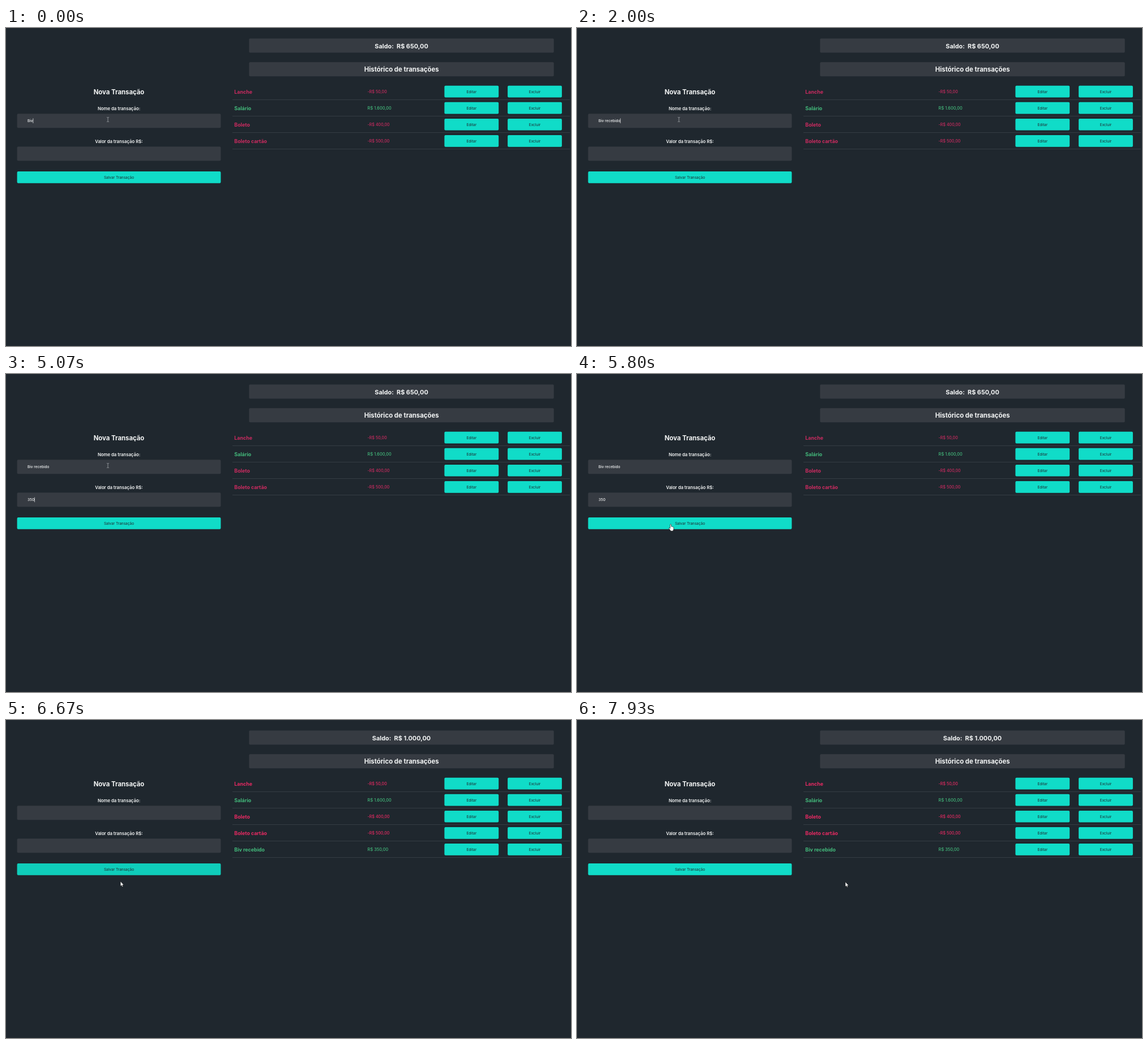
Animation of 998 by 561 pixels, one loop 8 s. Source, as an HTML page:

```html
<!DOCTYPE html>
<html lang="pt-BR">
<head>
<meta charset="utf-8">
<title>Transações</title>
<style>
html, body { margin: 0; width: 100%; height: 100%; overflow: hidden; background: #1f272e; }
svg { display: block; width: 100%; height: 100%; }
text { font-family: Inter, sans-serif; white-space: pre; }
</style>
</head>
<body>
<svg id="stage" viewBox="0 0 998 561"></svg>
<script>
const LOOP = 8000;
const TEAL = '#10dcc8', PANEL = '#363b42', WHITE = '#f3f5f5', INK = '#1f272e';
const GREEN = '#43b97b';
const stage = document.getElementById('stage');

function add(tag, attrs, parent = stage) {
  const el = document.createElementNS('http://www.w3.org/2000/svg', tag);
  for (const k in attrs) el.setAttribute(k, attrs[k]);
  parent.appendChild(el);
  return el;
}

const box = (x, y, w, h, fill, parent) =>
  add('rect', { x, y, width: w, height: h, rx: 2, fill }, parent);

// cy is the middle of the capital letters
function label(str, x, cy, size, weight, fill, anchor = 'middle', parent) {
  const el = add('text', {
    x, y: cy + size * 0.364, fill, 'font-size': size,
    'font-weight': weight, 'text-anchor': anchor
  }, parent);
  el.textContent = str;
  return el;
}

function button(str, x, y, w, parent) {
  const rect = box(x, y, w, 20.7, TEAL, parent);
  label(str, x + w / 2, y + 10.7, 6.5, 400, INK, 'middle', parent);
  return rect;
}

// Balance and history
box(429.3, 18.6, 538.4, 25, PANEL);
box(429.3, 60.2, 538.4, 25, PANEL);
const balance = label('', 698.5, 31.6, 10.9, 700, WHITE);
label('Histórico de transações', 698.7, 73.2, 11.4, 700, WHITE);

const reds = [];
function row(i, name, value) {
  const g = add('g', {});
  const y = 101.8 + i * 29.05;
  const gain = value[0] !== '-';
  const texts = [
    label(name, 403.3, y + 10.9, 8.85, 700, GREEN, 'start', g),
    label(value, 638.6, y + 10.8, gain ? 7.4 : 7.1, 500, GREEN, 'start', g)
  ];
  if (!gain) reds.push(...texts);
  button('Editar', 774.4, y, 95.8, g);
  button('Excluir', 886.1, y, 95.8, g);
  add('rect', { x: 400, y: y + 24.2, width: 596, height: 0.8, fill: '#3a4249' }, g);
  return g;
}
row(0, 'Lanche', '-R$ 50,00');
row(1, 'Salário', 'R$ 1.600,00');
row(2, 'Boleto', '-R$ 400,00');
row(3, 'Boleto cartão', '-R$ 500,00');
const newRow = row(4, 'Biv recebido', 'R$ 350,00');

// Form
label('Nova Transação', 199.5, 112.8, 11.35, 700, WHITE);
label('Nome da transação:', 199.5, 142.2, 7.75, 600, WHITE);
label('Valor da transação R$:', 199.5, 200.3, 7.75, 600, WHITE);
function field(y) {
  box(19.6, y, 359.8, 25, PANEL);
  return label('', 38, y + 12.5, 6.45, 500, WHITE, 'start');
}
const nameField = field(151.3);
const valueField = field(209.3);
const save = button('Salvar Transação', 19.6, 253, 359.8);
const caret = add('rect', { width: 0.7, height: 8.6, fill: WHITE });

// Pointers, each with its hot spot at 0,0
const pointers = {
  beam: add('path', {
    d: 'M-2-4Q0-4 0-3Q0-4 2-4M0-3V3M-2 4Q0 4 0 3Q0 4 2 4',
    fill: 'none', stroke: '#a9adb0', 'stroke-width': 0.75
  }),
  arrow: add('path', {
    d: 'M0 0V8.4L1.9 6.7L3.1 9.4L4.5 8.8L3.3 6.2H5.8Z',
    fill: '#fff', stroke: '#111', 'stroke-width': 0.5
  }),
  hand: add('path', {
    d: 'M-1 .8Q-1-.3 0-.3Q.9-.3 1 .8V4Q2 3.2 2.7 4.2Q3.6 3.7 4.1 4.7Q5.3 4.4 5.3 5.7V8Q5.3 9.6 4.3 10.5V11.8H-.4V10.8L-3.2 7.3Q-3.6 6.2-2.6 6L-1 7.2Z',
    fill: '#fff', stroke: '#111', 'stroke-width': 0.6
  })
};

// Typing: [time, number of letters]
const nameKeys = [[0, 3], [130, 4], [400, 5], [870, 6], [1000, 7], [1400, 8], [1600, 9], [1670, 11], [1730, 12]];
const valueKeys = [[0, 0], [4670, 1], [4730, 2], [5000, 3]];
const typed = (str, keys, t) => str.slice(0, keys.filter(k => k[0] <= t).pop()[1]);

// Pointer path: [time, x, y]
const path = [
  [0, 180, 161.5], [5130, 180, 161.5], [5400, 175, 205], [5670, 167, 260],
  [5800, 165.5, 265.2], [6200, 167, 265.2], [6330, 171, 276], [6400, 175, 285], [6600, 175, 285],
  [6900, 290, 284], [7200, 409.5, 264.7], [7420, 409.5, 264.7],
  [7650, 437, 276], [7930, 474, 285.7], [LOOP, 474, 285.7]
];
const mix = (a, b, k) => a + (b - a) * k;
const ramp = (t, a, b) => Math.min(1, Math.max(0, (t - a) / (b - a)));

function pointerAt(t) {
  const i = path.findIndex(p => p[0] > t);
  const [a, b] = [path[i - 1], path[i]];
  const k = ramp(t, a[0], b[0]);
  return [mix(a[1], b[1], k), mix(a[2], b[2], k)];
}

function pointerKind(x, y) {
  const inside = (top, bottom) => x > 19 && x < 380 && y > top && y < bottom;
  if (inside(151, 176) || inside(209, 234)) return 'beam';
  return inside(253, 274) ? 'hand' : 'arrow';
}

const show = (el, on) => el.setAttribute('visibility', on ? 'visible' : 'hidden');

function drawCaret(t) {
  const onValue = t >= 2400;
  const input = onValue ? valueField : nameField;
  const blinkOff = (t >= 2200 && t < 2400) || (t >= 3000 && t < 3400) || (t >= 4070 && t < 4400);
  show(caret, t < 5530 && !blinkOff);
  const width = input.textContent ? input.getComputedTextLength() : 0;
  caret.setAttribute('x', 38 + width);
  caret.setAttribute('y', onValue ? 217.5 : 159.4);
}

function draw(t) {
  const saved = t >= 6070;
  nameField.textContent = saved ? '' : typed('Biv recebido', nameKeys, t);
  valueField.textContent = saved ? '' : typed('350', valueKeys, t);
  drawCaret(t);

  show(newRow, saved);
  balance.textContent = 'Saldo:  R$ ' + (t < 6330 ? '650,00' : '1.000,00');
  for (const el of reds) el.setAttribute('fill', t < 6000 ? '#cc2b60' : '#e92a63');

  const dark = ramp(t, 5900, 6130) - ramp(t, 6370, 6730);
  const tone = [[16, 8], [220, 127], [200, 117]].map(c => Math.round(mix(c[0], c[1], dark)));
  save.setAttribute('fill', `rgb(${tone})`);

  const [x, y] = pointerAt(t);
  const kind = pointerKind(x, y);
  for (const k in pointers) show(pointers[k], k === kind);
  pointers[kind].setAttribute('transform', `translate(${x} ${y})`);
}

const start = performance.now();
function tick() {
  draw((performance.now() - start) % LOOP);
  requestAnimationFrame(tick);
}
tick();
</script>
</body>
</html>
```
